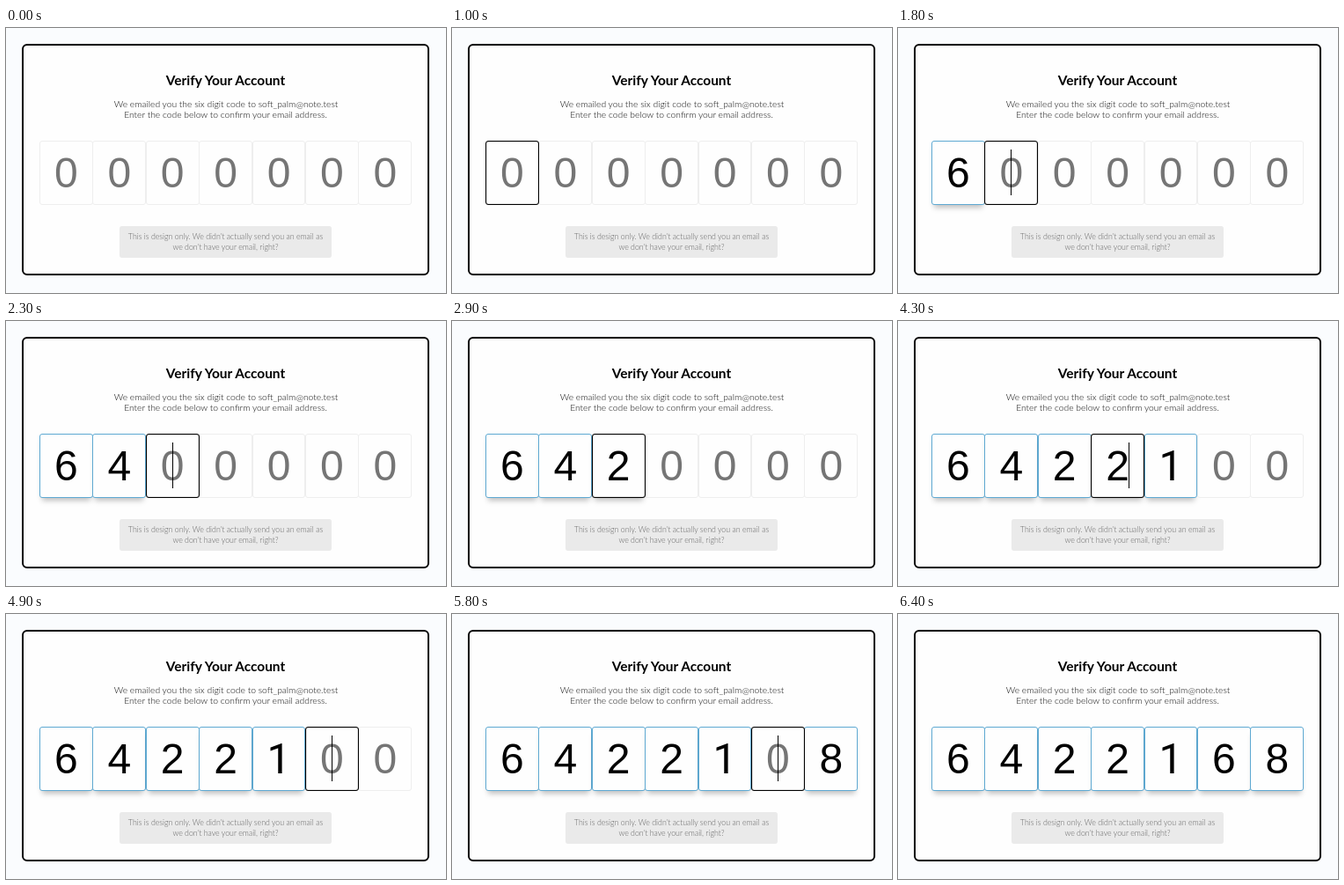
Write an HTML page that moves like this. It is 500 by 301 pixels and loops after 6.5 s.

```html
<!DOCTYPE html>
<html lang="en">
<head>
<meta charset="utf-8">
<title>Verify Your Account</title>
<style>
  html, body { margin: 0; width: 100%; height: 100%; overflow: hidden; background: #fafcfe; }
  svg { position: absolute; left: 0; top: 0; }
  text { font-family: Lato, sans-serif; text-anchor: middle; }
  .title { font-size: 15.45px; font-weight: 700; }
  .info { font-size: 10.3px; font-weight: 300; fill: #111; }
  .note { font-size: 8.8px; font-weight: 300; fill: #666; }
  .cell {
    position: absolute; top: 128px; width: 60.8px; height: 73px;
    box-sizing: border-box; border: 1px solid #eee; border-radius: 3px;
    background: #fefefe; color: #757575; text-align: center;
    font: 48px/71px "Liberation Sans", Arial, sans-serif;
  }
  .valid { color: #000; border-color: #5ea9d2; box-shadow: 0 6px 6px -3px rgba(0, 0, 0, .25); }
  .focus { z-index: 1; border-color: #000; box-shadow: inset 0 0 1px #000; }
  .valid.focus { box-shadow: inset 0 0 1px #000, 0 6px 6px -3px rgba(0, 0, 0, .25); }
  .one { font-family: Roboto, sans-serif; } /* a 1 without a foot */
  #caret { position: absolute; z-index: 2; top: 138px; width: 1px; height: 52px; background: #000; }
</style>
</head>
<body>
<svg width="500" height="301">
  <rect x="19" y="19" width="461" height="261" rx="5" fill="#fefefe" stroke="#000" stroke-width="2"/>
  <text class="title" x="249.5" y="65">Verify Your Account</text>
  <text class="info" x="250" y="89.5">We emailed you the six digit code to soft_palm@note.test</text>
  <text class="info" x="249.5" y="102">Enter the code below to confirm your email address.</text>
  <rect x="129" y="225" width="241" height="36" rx="3" fill="#eaeaea"/>
  <text class="note" x="249.5" y="240">This is design only. We didn't actually send you an email as</text>
  <text class="note" x="249.5" y="252">we don't have your email, right?</text>
</svg>
<script>
  const LOOP = 6500, LEFT = 38, PITCH = 60.4;
  // [time, action, value]: focus a cell, type a digit, hide the caret
  const events = [
    [200, 'focus', 0], [1000, 'hide'], [1200, 'type', 6],
    [1700, 'focus', 1], [2100, 'type', 4],
    [2300, 'focus', 2], [2700, 'type', 2], [2900, 'hide'],
    [3200, 'focus', 4], [3400, 'type', 1],
    [3800, 'focus', 3], [4300, 'type', 2], [4500, 'hide'],
    [4900, 'focus', 5],
    [5300, 'focus', 6], [5400, 'type', 8],
    [5800, 'focus', 5], [6000, 'type', 6], [6400, 'focus', -1]
  ];

  const add = className => {
    const el = document.body.appendChild(document.createElement('div'));
    el.className = className;
    return el;
  };
  const cells = Array.from({ length: 7 }, (_, i) => {
    const cell = add('cell');
    cell.style.left = LEFT + i * PITCH + 'px';
    return cell;
  });
  const caret = add('');
  caret.id = 'caret';

  function draw(t) {
    const digits = [];
    let focus = -1, caretOn = false;
    for (const [time, action, value] of events) {
      if (time > t) break;
      caretOn = action !== 'hide';
      if (action === 'focus') focus = value;
      if (action === 'type') digits[focus] = value;
    }
    cells.forEach((cell, i) => {
      const filled = i in digits;
      cell.textContent = filled ? digits[i] : 0;
      cell.className = 'cell';
      cell.classList.toggle('valid', filled);
      cell.classList.toggle('focus', i === focus);
      cell.classList.toggle('one', digits[i] === 1);
    });
    caret.hidden = !caretOn || focus < 0;
    caret.style.left = Math.round(LEFT + 30 + focus * PITCH + (focus in digits ? 12.5 : 0)) + 'px';
  }

  const start = performance.now();
  function tick() {
    draw((performance.now() - start) % LOOP);
    requestAnimationFrame(tick);
  }
  tick();
</script>
</body>
</html>
```
